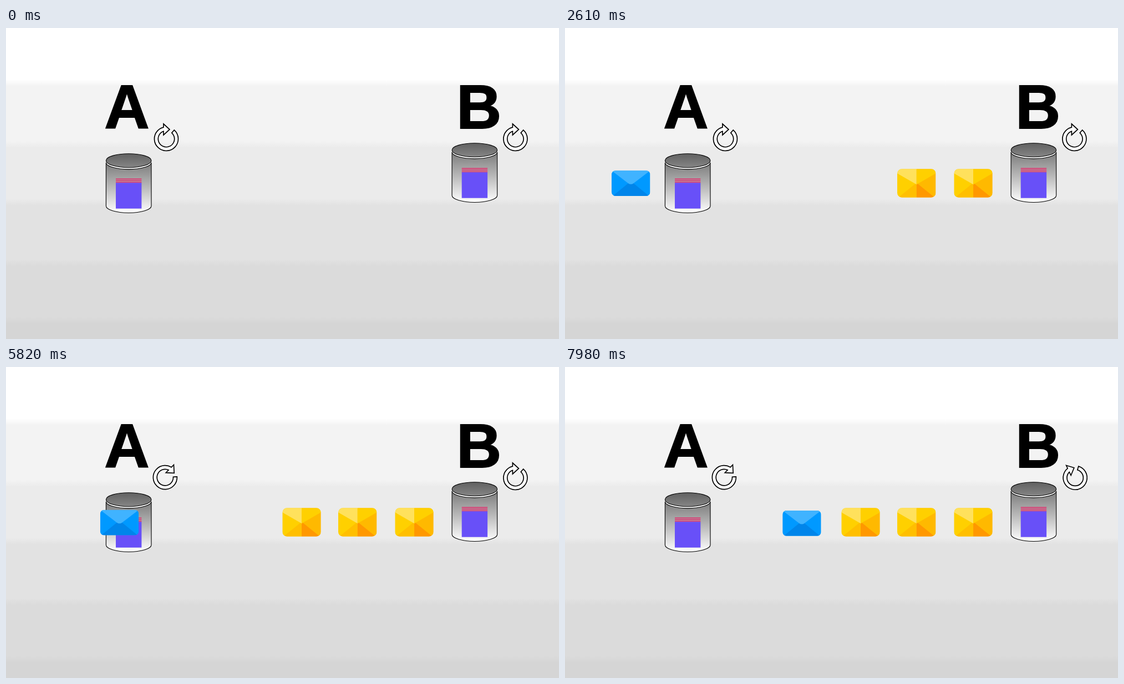
An HTML page with a canvas that plays this animation: 997x561 px, repeating every 8000 ms.

```html
<!DOCTYPE html>
<html lang="en">
<head>
<meta charset="utf-8">
<title>Messages between A and B</title>
<style>
  html, body { margin: 0; width: 100%; height: 100%; overflow: hidden; background: #fff; }
  canvas { display: block; width: 100%; height: 100%; }
</style>
</head>
<body>
<canvas id="stage" width="997" height="561"></canvas>
<script>
const W = 997, H = 561, LOOP = 8000, STEP = 30;
const ctx = document.getElementById('stage').getContext('2d');
const rad = deg => deg * Math.PI / 180;
const clamp = u => Math.max(0, Math.min(1, u));

// Progress 0..1 with constant acceleration over share a and braking over share d.
function ramp(u, a, d) {
  u = clamp(u);
  const v = 1 / (1 - a / 2 - d / 2);
  if (u < a) return v * u * u / (2 * a);
  if (u > 1 - d) return 1 - v * (1 - u) ** 2 / (2 * d);
  return v * (u - a / 2);
}

// Left edge of an item that flies in, passes its place and settles back.
function flyIn(t, start, left, width) {
  const run = 650, settle = 250, over = 26;
  const age = t - start;
  if (age < run) return -width + Math.max(0, age) / run * (left + over + width);
  return left + over * (1 - clamp((age - run) / settle)) ** 2;
}

function poly(color, ...pts) {
  ctx.fillStyle = color;
  ctx.beginPath();
  for (let i = 0; i < pts.length; i += 2) ctx.lineTo(pts[i], pts[i + 1]);
  ctx.fill();
}

function vertical(y0, y1, ...stops) {
  const g = ctx.createLinearGradient(0, y0, 0, y1);
  stops.forEach((c, i) => g.addColorStop(i / (stops.length - 1), c));
  return g;
}

function background() {
  const tones = ['#ffffff', '#f3f3f3', '#ebebeb', '#e2e2e2', '#dbdbdb', '#d5d5d5'];
  const edges = [99, 210, 314, 423, 527];
  const g = ctx.createLinearGradient(0, 0, 0, H);
  edges.forEach((y, i) => {
    g.addColorStop((y - 6) / H, tones[i]);
    g.addColorStop((y + 6) / H, tones[i + 1]);
  });
  ctx.fillStyle = g;
  ctx.fillRect(0, 0, W, H);
}

function letter(char, x) {
  ctx.font = 'bold 112px "Liberation Sans", Arial, sans-serif';
  ctx.textAlign = 'center';
  ctx.fillStyle = ctx.strokeStyle = '#000';
  ctx.lineWidth = 2;
  ctx.fillText(char, x, 181);
  ctx.strokeText(char, x, 181);
}

function canister(x, y) {
  const cx = 41, rx = 40.8, ry = 12.5;
  ctx.save();
  ctx.translate(x, y);
  ctx.lineWidth = 1.1;
  ctx.strokeStyle = '#000';

  ctx.fillStyle = '#fff';
  ctx.beginPath();
  ctx.ellipse(cx, 16.2, rx, 12.2, 0, 0, Math.PI * 2);
  ctx.fill();

  ctx.beginPath();
  ctx.ellipse(cx, 16.2, rx, 12.2, 0, Math.PI, 0, true);
  ctx.ellipse(cx, 94.5, rx, ry, 0, 0, Math.PI);
  ctx.closePath();
  ctx.fillStyle = vertical(17, 107, '#7c7c7c', '#bcbcbc', '#ffffff');
  ctx.fill();
  ctx.stroke();

  ctx.beginPath();
  ctx.ellipse(cx, 12.7, rx, ry, 0, 0, Math.PI * 2);
  ctx.fillStyle = vertical(0, 26, '#606060', '#878787');
  ctx.fill();
  ctx.stroke();

  ctx.fillStyle = '#de3570';
  for (let i = 0; i < 3; i++) ctx.fillRect(17.8, 45 + i * 3, 46.4, 1.8);
  ctx.fillStyle = '#6850f8';
  ctx.fillRect(17.8, 52.8, 46.4, 46.4);
  ctx.restore();
}

function reloadArrow(x, y, angle) {
  const cy = 3, outer = 21.5, inner = 14.7, neck = -5, tail = rad(-48);
  const end = r => Math.atan2(-Math.sqrt(r * r - neck * neck), neck);
  ctx.save();
  ctx.translate(x, y);
  ctx.rotate(rad(angle));
  ctx.beginPath();
  ctx.moveTo(neck, -24);
  ctx.lineTo(6, -14);
  ctx.lineTo(neck, -4);
  ctx.arc(0, cy, inner, end(inner), tail, true);
  ctx.arc(0, cy, outer, tail, end(outer));
  ctx.closePath();
  ctx.fillStyle = '#fff';
  ctx.fill();
  ctx.lineWidth = 1.7;
  ctx.strokeStyle = '#000';
  ctx.stroke();
  ctx.restore();
}

function envelope(x, y, w, h, r, paint) {
  ctx.save();
  ctx.translate(x, y);
  ctx.beginPath();
  ctx.roundRect(0, 0, w, h, r);
  ctx.clip();
  paint(w, h, w / 2);
  ctx.restore();
}

function yellowPaint(w, h, m) {
  const fold = 8, c = 28;
  poly('#ffd000', 0, 0, m, 0, m, h, 0, h);
  poly('#ffb900', m, 0, w, 0, w, h, m, h);
  poly('#ffbf00', 2, h, m, c - 3, m, h);
  poly('#ff9800', m, h, m, c - 3, w - 2, h);
  poly('#ffe15c', 0, 0, m, 0, m, c, 0, fold);
  poly('#ffd000', m, 0, w, 0, w, fold, m, c);
}

function bluePaint(w, h, m) {
  poly('#0099ff', 0, 0, w, 0, w, h, 0, h);
  poly('#0085ea', 2, h, m, 19, w - 2, h);
  ctx.fillStyle = '#40b3ff';
  ctx.beginPath();
  ctx.moveTo(0, 0);
  ctx.lineTo(m - 5, 22.8);
  ctx.quadraticCurveTo(m, 26.5, m + 5, 22.8);
  ctx.lineTo(w, 0);
  ctx.fill();
}

const yellows = [
  { start: 636, left: 701.3 },
  { start: 1714, left: 599 },
  { start: 2791, left: 498.3 }
];

const spin = (t, start) => 405 * ramp((t - start) / 1800, 0.4, 0);

function draw(t) {
  background();
  letter('A', 218);
  letter('B', 852.8);
  canister(180.2, 226.5);
  canister(803.9, 207.5);
  reloadArrow(289, 197, spin(t, 3690));
  reloadArrow(918.4, 197, spin(t, 6430));

  for (const { start, left } of yellows) {
    envelope(flyIn(t, start, left, 69.5), 254.3, 69.5, 51.4, 8.5, yellowPaint);
  }
  const slide = ramp((t - 5491) / 900, 0.4, 0.4);
  const blueX = flyIn(t, 460, 84, 69.5) + 308.2 * slide;
  envelope(blueX, 257.2 + 1.7 * slide, 69.5, 45.8, 7, bluePaint);
}

const origin = performance.now();
function tick() {
  const t = (performance.now() - origin) % LOOP;
  draw(Math.floor(t / STEP) * STEP);
  requestAnimationFrame(tick);
}
tick();
</script>
</body>
</html>
```
